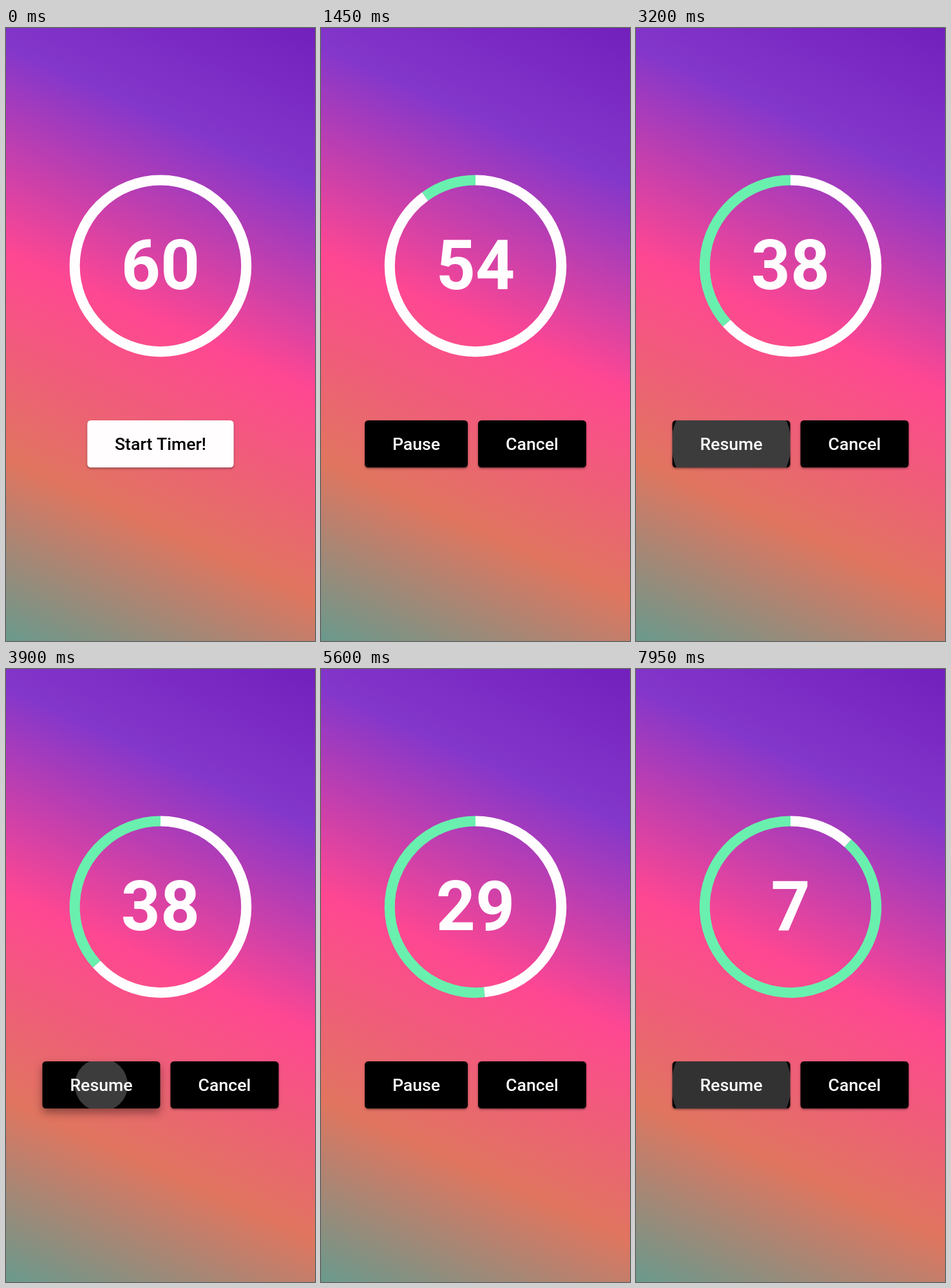
An HTML page with a canvas for the animation above (8000 ms loop, 480 by 953 pixels).

```html
<!DOCTYPE html>
<html lang="en">
<head>
<meta charset="utf-8">
<title>Countdown timer</title>
<style>
  html, body { margin: 0; width: 100%; height: 100%; overflow: hidden; }
  canvas { display: block; width: 480px; height: 953px; }
</style>
</head>
<body>
<canvas id="stage" width="480" height="953"></canvas>
<script>
const ctx = document.getElementById('stage').getContext('2d');
const LOOP = 8000, STEP = 50, TICK = 100, TOTAL = 60;
const CENTER = { x: 240, y: 369.8 };
const BUTTON = { top: 610, height: 73.3, radius: 5.3, padding: 42.67, gap: 16 };
const FONT = 'Roboto, sans-serif';

// Each press runs from finger down to finger up; the action fires on release.
const START = { down: 600, up: 800, width: 227.4 };
const PAUSE = { down: 2850, up: 3010, width: 160 };
const RESUME = { down: 3650, up: 4601, width: 183 };
const PAUSE_AGAIN = { down: 7500, up: 7701, width: 160 };

const clamp = v => Math.min(1, Math.max(0, v));
const lerp = (a, b, v) => a + (b - a) * v;
const ease = v => v * v * (3 - 2 * v);

const background = ctx.createLinearGradient(480, -75, 0, 992);
['#6d19b8', '#8437cb', '#ff4792', '#e0755f', '#589f93']
  .forEach((color, i) => background.addColorStop(i / 4, color));

function secondsAt(t) {
  const first = clamp((t - START.up) / (PAUSE.up - START.up)) * (PAUSE.up - START.up);
  const second = clamp((t - RESUME.up) / (PAUSE_AGAIN.up - RESUME.up)) * (PAUSE_AGAIN.up - RESUME.up);
  return TOTAL - Math.floor(first / TICK + 1e-6) - Math.floor(second / TICK + 1e-6);
}

function latestPress(t) {
  return [START, PAUSE, RESUME, PAUSE_AGAIN].filter(p => t >= p.down).pop();
}

function elevation(press, t) {
  if (!press) return 2;
  const raised = ease(clamp((t - press.down) / 200));
  return 2 + 6 * raised * (1 - ease(clamp((t - press.up) / 200)));
}

function ripple(press, t) {
  const held = (Math.min(t, press.up) - press.down) / 1000;
  const released = Math.max(0, t - press.up);
  const reach = Math.hypot(press.width, BUTTON.height) / 2;
  return {
    radius: lerp(0.3 * reach, reach + 5, ease(clamp(held + released / 225))),
    alpha: 0.24 * clamp((t - press.down) / 75) * (1 - clamp((released - 225) / 150))
  };
}

function drawText(text, x, y, size, weight, color) {
  ctx.font = `${weight} ${size}px ${FONT}`;
  ctx.textAlign = 'center';
  ctx.fillStyle = color;
  ctx.fillText(text, x, y);
}

function drawButton(label, x, width, fill, color, press, t) {
  const { top, height, radius } = BUTTON;
  const lift = elevation(press, t);
  ctx.save();
  ctx.beginPath();
  ctx.roundRect(x, top, width, height, radius);
  ctx.shadowColor = 'rgba(0, 0, 0, 0.38)';
  ctx.shadowOffsetY = lift * 0.85;
  ctx.shadowBlur = lift * 1.7;
  ctx.fillStyle = fill;
  ctx.fill();
  ctx.shadowColor = 'transparent';
  if (press) {
    const wave = ripple(press, t);
    ctx.clip();
    ctx.beginPath();
    ctx.arc(x + width / 2, top + height / 2, wave.radius, 0, 2 * Math.PI);
    ctx.fillStyle = `rgba(255, 250, 252, ${wave.alpha})`;
    ctx.fill();
  }
  ctx.restore();
  drawText(label, x + width / 2, 656, 26.67, 500, color);
}

function drawControls(t) {
  const press = latestPress(t);
  if (t < START.up) {
    drawButton('Start Timer!', 126.3, START.width, '#fffdfe', '#000', press, t);
    return;
  }
  const paused = (t >= PAUSE.up && t < RESUME.up) || t >= PAUSE_AGAIN.up;
  const width = paused ? RESUME.width : PAUSE.width;
  const cancelWidth = 168;
  const left = 240 - (width + BUTTON.gap + cancelWidth) / 2;
  drawButton(paused ? 'Resume' : 'Pause', left, width, '#000', '#fff',
    press === START ? null : press, t);
  drawButton('Cancel', left + width + BUTTON.gap, cancelWidth, '#000', '#fff', null, t);
}

function drawArc(from, to, color) {
  const turn = v => (v - 0.25) * 2 * Math.PI;
  ctx.beginPath();
  ctx.arc(CENTER.x, CENTER.y, 133.33, turn(from), turn(to));
  ctx.lineWidth = 16;
  ctx.strokeStyle = color;
  ctx.stroke();
}

function draw(t) {
  ctx.fillStyle = background;
  ctx.fillRect(0, 0, 480, 953);
  const seconds = secondsAt(t);
  const left = seconds / TOTAL;
  if (left < 1) drawArc(left, 1, '#69f0ae');
  drawArc(0, left, '#fffdfe');
  drawText(seconds, CENTER.x, 406.3, 106.67, 700, '#fffdfe');
  drawControls(t);
}

const begin = performance.now();
function frame() {
  const t = (performance.now() - begin) % LOOP;
  draw(Math.floor(t / STEP) * STEP);
  requestAnimationFrame(frame);
}
frame();
</script>
</body>
</html>
```
